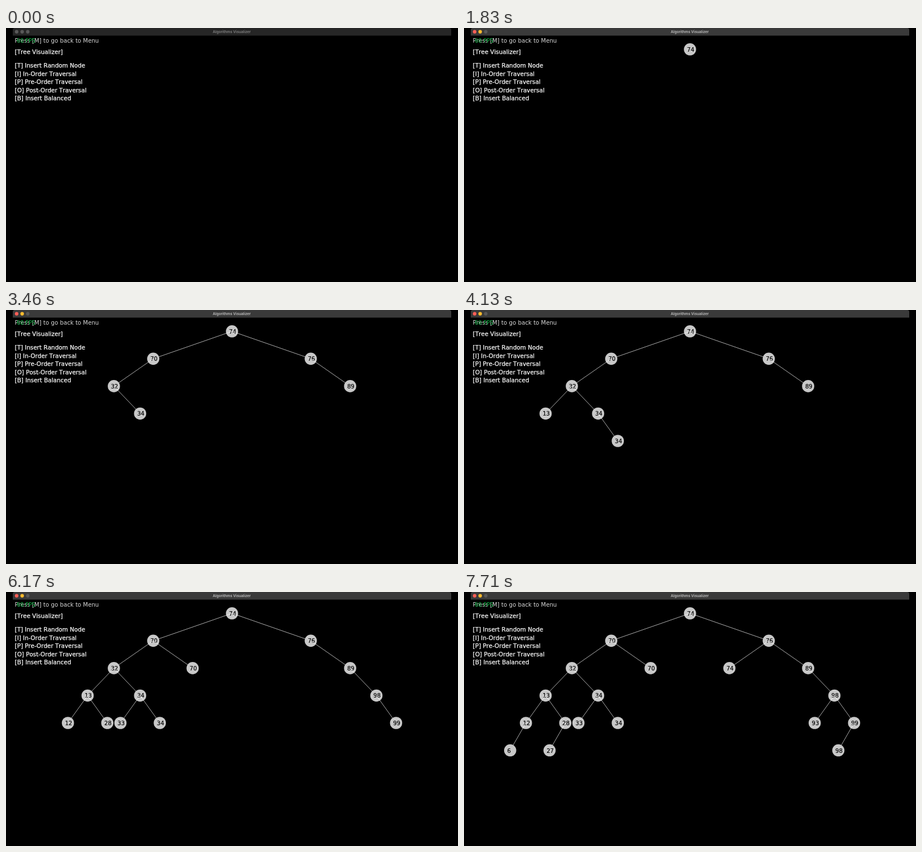
Recreate the animation shown at these times as an HTML page. Size 800 by 450 pixels, loop 8000 ms.

```html
<!DOCTYPE html>
<html lang="en">
<head>
<meta charset="utf-8">
<title>Algorithms Visualizer</title>
<style>
html, body { margin: 0; width: 100%; height: 100%; overflow: hidden; background: #000; }
svg { display: block; width: 100vw; height: 100vh; }
text { font-kerning: none; white-space: pre; }

.title { font: 600 6.5px Inter, sans-serif; text-anchor: middle; }
.hud { font: 10.4px "DejaVu Sans", sans-serif; fill: #fff; stroke: #fff; stroke-width: .25; }
.hint { font-size: 10.2px; fill: #d8d8d8; stroke: none; }
.fps { font-size: 9.7px; fill: #00a838; stroke: none; }

.node circle { fill: #c8c8c8; }
.node text { font: 10px "DejaVu Sans", sans-serif; fill: #000; stroke: #000; stroke-width: .2; }
.node line { stroke: #fff; stroke-width: .9; stroke-opacity: .75; }

/* the window gains focus */
.bar { fill: #3a3a3a; animation: bar 8s infinite; }
.title { fill: #c4c4c4; animation: title 8s infinite; }
.light { fill: #585858; }
.close { fill: #ff5f57; animation: light 8s infinite; }
.minimize { fill: #febc2e; animation: light 8s infinite; }
.bar, .title, .close, .minimize { animation-timing-function: steps(5, start); }
@keyframes bar { 0%, 6.2% { fill: #262626; } 8.8%, 100% { fill: #3a3a3a; } }
@keyframes title { 0%, 6.2% { fill: #858585; } 8.8%, 100% { fill: #c4c4c4; } }
@keyframes light { 0%, 6.2% { fill: #5a5a5a; } 8.8%, 100% { fill: var(--lit); } }
</style>
</head>
<body>
<svg viewBox="0 0 800 450">
  <path class="bar" d="M12 13.4V3.5Q12 0 15.5 0H784.5Q788 0 788 3.5V13.4Z"/>
  <circle class="close" style="--lit: #ff5f57" cx="18.8" cy="6.7" r="3.1"/>
  <circle class="minimize" style="--lit: #febc2e" cx="28.6" cy="6.7" r="3.1"/>
  <circle class="light" cx="38.5" cy="6.7" r="3.1"/>
  <text class="title" x="399.6" y="8.9">Algorithms Visualizer</text>

  <g class="hud">
    <text class="hint" x="15.6" y="26.4">Press [M] to go back to Menu</text>
    <text class="fps" x="19" y="25.7">60 FPS</text>
    <text x="15.6" y="46">[Tree Visualizer]</text>
    <text x="15.6" y="70.2">[T] Insert Random Node</text>
    <text x="15.6" y="84.8">[I] In-Order Traversal</text>
    <text x="15.6" y="99.3">[P] Pre-Order Traversal</text>
    <text x="15.6" y="113.9">[O] Post-Order Traversal</text>
    <text x="15.6" y="128.4">[B] Insert Balanced</text>
  </g>
  <g id="tree"></g>
</svg>
<script>
const LOOP = 8000;
const ROOT = { x: 400, y: 37.8 };
const SPREAD = 139.4;
const LEVEL = 48.55;

// [time in ms, value]
const inserts = [
  [1830, 74], [2170, 76], [2500, 70], [2750, 32], [3080, 34], [3460, 89],
  [3750, 34], [4130, 13], [4420, 12], [4790, 98], [5130, 70], [5460, 28],
  [5790, 33], [6170, 99], [6420, 98], [6750, 6], [7040, 93], [7380, 74],
  [7710, 27]
];

const tree = document.getElementById('tree');
const sheet = document.head.appendChild(document.createElement('style'));
let root = null;

function add(parent, tag, attrs, text = '') {
  const el = document.createElementNS('http://www.w3.org/2000/svg', tag);
  for (const key in attrs) el.setAttribute(key, attrs[key]);
  el.textContent = text;
  return parent.appendChild(el);
}

// Binary search tree: equal values go right, the offset shrinks with depth.
function insert(value) {
  if (!root) return root = { value, ...ROOT };
  let parent = root, depth = 1;
  for (;; depth++) {
    const side = value < parent.value ? 'left' : 'right';
    if (parent[side]) {
      parent = parent[side];
      continue;
    }
    const dx = SPREAD / depth * (side === 'left' ? -1 : 1);
    return parent[side] = { value, parent, x: parent.x + dx, y: parent.y + LEVEL };
  }
}

function draw({ value, parent, x, y }, time, index) {
  const g = add(tree, 'g', { class: 'node' });
  if (parent) add(g, 'line', { x1: parent.x, y1: parent.y, x2: x, y2: y });
  add(g, 'circle', { cx: x, cy: y, r: 10.8 });
  add(g, 'text', { x: x - 5.2, y: y + 4 }, value);

  const start = (time - 4) / LOOP * 100;
  sheet.textContent +=
    `@keyframes insert${index} { 0% { opacity: 0 } ${start}%, 100% { opacity: 1 } }\n`;
  g.style.animation = `insert${index} ${LOOP}ms step-end infinite`;
}

inserts.forEach(([time, value], i) => draw(insert(value), time, i));
</script>
</body>
</html>
```
